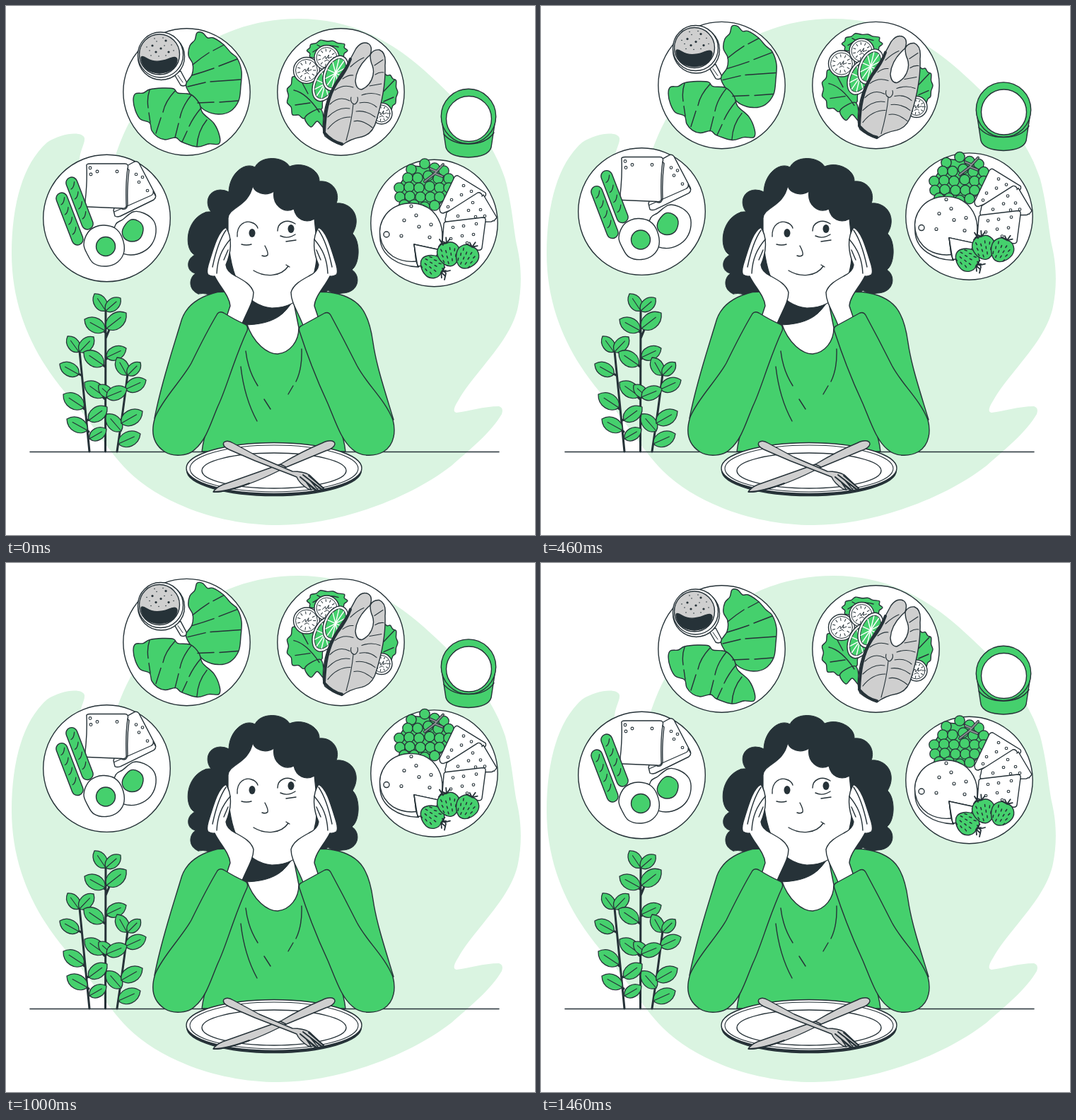
These frames come from a looping animation (748x748 px, 1500 ms). An HTML page:

```html
<!DOCTYPE html>
<html lang="en">
<head>
<meta charset="utf-8">
<title>Daydreaming of food</title>
<style>
html,body{margin:0;width:100%;height:100%;overflow:hidden;background:#fff}
svg{display:block;width:100vw;height:100vh}
</style>
</head>
<body>
<svg id="stage" viewBox="0 0 748 748" stroke-linecap="round" stroke-linejoin="round"></svg>
<script>
const INK = '#263238', GREEN = '#45d06d', PALE = '#daf4e1', GREY = '#cfcfcf', WHITE = '#fff';

const path = (d, fill = 'none', w = 1.4, stroke = INK) =>
  `<path d="${d}" fill="${fill}" stroke="${stroke}" stroke-width="${w}"/>`;
const oval = (x, y, rx, ry, fill = WHITE, w = 1.4) =>
  `<ellipse cx="${x}" cy="${y}" rx="${rx}" ry="${ry}" fill="${fill}" stroke="${INK}" stroke-width="${w}"/>`;
const disc = (x, y, r, fill, w) => oval(x, y, r, r, fill, w);
const at = (x, y, rot, body) => `<g transform="translate(${x} ${y}) rotate(${rot})">${body}</g>`;
const pairs = s => s.trim().split(/\s+/).map(p => p.split(',').map(Number));
const dots = (s, r, fill, w = 1.1) => pairs(s).map(([x, y]) => disc(x, y, r, fill, w)).join('');
const range = (n, fn) => Array.from({length: n}, (_, i) => fn(i)).join('');

// Smooth closed outline through a few points
function smooth(s, fill, w) {
  const p = pairs(s), n = p.length, q = i => p[(i + n) % n];
  let d = 'M' + p[0];
  for (let i = 0; i < n; i++) {
    const [a, b, c, e] = [q(i - 1), q(i), q(i + 1), q(i + 2)];
    const c1 = b.map((v, k) => v + (c[k] - a[k]) / 6);
    const c2 = c.map((v, k) => v - (e[k] - b[k]) / 6);
    d += `C${c1} ${c2} ${c}`;
  }
  return path(d + 'Z', fill, w);
}

function ruffle(x, y, rx, ry, n) {
  const pts = [];
  for (let i = 0; i < n * 2; i++) {
    const a = i * Math.PI / n, k = i % 2 ? 0.88 : 1 + 0.05 * Math.sin(i * 5);
    pts.push((x + rx * k * Math.cos(a)).toFixed(1) + ',' + (y + ry * k * Math.sin(a)).toFixed(1));
  }
  return smooth(pts.join(' '), GREEN);
}

function leaf(x1, y1, x2, y2) {
  const dx = x2 - x1, dy = y2 - y1;
  const pt = (u, v) => `${(x1 + u * dx - v * dy).toFixed(1)},${(y1 + u * dy + v * dx).toFixed(1)}`;
  return path(`M${pt(0, 0)}C${pt(.15, -.4)} ${pt(.75, -.42)} ${pt(1, 0)}C${pt(.75, .42)} ${pt(.15, .4)} ${pt(0, 0)}Z`, GREEN, 1.3)
    + path(`M${pt(0, 0)}L${pt(.72, 0)}`, 'none', 1.1);
}

function backdrop() {
  return path(`M8,350C8,285 22,225 58,193C78,180 108,176 111,187C112,195 103,206 104,222L150,228
    C158,198 170,168 190,138C235,75 310,18 413,18C510,18 570,70 610,108C655,150 690,195 706,245
    C716,285 717,310 722,337C730,370 729,400 724,425C714,475 660,520 640,557Q629,574 637,575
    C655,573 675,566 697,566Q704,568 701,577C686,603 655,628 630,650C565,700 465,734 385,734
    C300,734 218,702 173,658C140,625 120,585 85,548C40,495 8,430 8,350Z`, PALE, 0, 'none')
    + path('M34,630.5H697', 'none', 1.5);
}

function plant() {
  const stems = 'M140.5,630L141,430M141,470L150,448M141,462L130,453M140,510L126,498M141,500L152,490'
    + 'M140,556L126,543M141,552L154,543M118,630L104,488M106,522L92,514M111,570L98,559M115,586L126,577'
    + 'M117,602L104,591M157,630Q166,570 172,520M169,543L180,536M163,592L176,581M161,602L152,588M159,618L174,612';
  const leaves = [
    [141,431,125,407], [141,431,162,413], [140,459,111,443], [142,456,170,434],
    [103,489,87,467], [104,489,124,468], [138,508,110,489], [142,497,170,484],
    [103,521,76,506], [171,522,157,497], [172,522,190,504], [169,542,198,529],
    [139,552,111,532], [150,553,131,536], [142,553,171,541], [110,568,81,549],
    [117,586,143,567], [163,601,142,577], [163,590,193,573], [115,600,86,584],
    [118,612,142,598], [159,619,190,605]];
  return path(stems, 'none', 3) + leaves.map(l => leaf(...l)).join('');
}

function woman() {
  const hand = path(`M311,313C300,318 294,340 286,366Q283,377 286,380Q291,383 295,382
    C303,398 316,410 317,424L311,442L332,454C339,434 350,420 350,405C347,394 336,388 325,382
    Q312,376 311,366C318,350 321,328 311,313Z`, WHITE)
    + path('M311,317C302,330 296,350 292,369M317,330C305,344 299,358 298,378M314,345L308,359');
  const folds = `M339,488Q342,515 356,537M332,510Q337,554 355,587M365,556L374,570
    M418,485Q419,513 410,531M406,537L399,549`;
  const eyes = 'M327,326C326,309 338,303 347,306Q354,308 356,314M384,318C384,306 397,300 409,308M333,337Q340,339 347,337M396,333L410,331M388,325Q398,330 409,323';
  return path(`M272,407C258,402 258,385 268,378C255,376 254,358 267,352C253,346 252,308 277,294
      Q283,290 290,291C281,280 284,261 303,260Q310,260 315,263C316,236 338,220 352,228
      C360,211 392,212 401,227C420,219 444,232 443,248C462,246 473,264 467,279
      C488,277 504,298 490,322C501,332 501,364 489,373C502,381 500,405 476,406Q464,408 455,402
      L440,415H300Q285,404 272,407Z`, INK, 1)
    + path(`M340,403L299,404.500C268,412 252,428 247,448C235,488 219,535 210,583L285,598Q279,612 277,630H480
      Q478,612 472,598L548,585C536,545 524,510 519,476C513,432 500,410 455,404.500Z`, GREEN)
    + path('M340,448C350,478 370,492 384,492C402,490 414,474 414,455L404,405H345Z', WHITE)
    + path('M344,405H412Q404,423 391,435C377,447 358,451 334,451Z', INK, 1)
    + path(`M314,320V300C315,284 343,284 349,254C351,264 366,270 379,262C376,281 392,294 407,287
      C410,302 424,308 436,301L440,340C440,390 420,427 376,427C340,424 316,390 314,320Z`, WHITE, 1.2)
    + path(eyes + 'M366,339Q371,348 370,352Q368,355 362,353M350,374C366,384 389,383 399,368M396,366L401,369')
    + oval(348, 321, 4.5, 6, INK, 0) + oval(403, 315, 4.5, 6, INK, 0)
    + hand + `<g transform="translate(753) scale(-1 1)">${hand}</g>`
    + path(`M299,435Q302,431 308,434Q324,444 338,450Q343,453 341,459C322,500 312,540 300,565
      C290,588 284,612 268,626C258,637 236,638 224,630C206,618 205,600 211,581C222,555 248,530 262,505Q284,460 299,435Z`, GREEN)
    + path(`M459,437Q456,432 451,434L418,452Q413,454 415,460C428,500 440,530 455,562
      C466,588 474,614 490,627C502,638 522,637 534,630C550,620 551,600 547,585C535,555 510,535 496,508Q478,472 459,437Z`, GREEN)
    + path(folds);
}

function emptyPlate() {
  return oval(379, 656.5, 123.5, 36, INK) + oval(379, 653.5, 124, 36)
    + oval(379, 654, 119, 33, 'none', 1.1) + oval(379, 657, 118 - 16, 25)
    + path('M461,615Q467,617 464,622Q460,627 452,629L394,653L388,648Q420,629 447,618Q455,614 461,615Z', GREY)
    + path('M388,648L396,652Q350,676 316,684Q301,688 293,687Q297,681 306,677Z', GREY)
    + path('M294,687Q312,687 344,675', 'none', 2)
    + path(`M308,617Q313,613 321,618L358,638L405,658Q420,658 429,663L449,682L446,684L431,672L441,684L437,685
      L425,674L432,684L427,683Q414,674 411,666L401,662L352,643L315,627Q305,622 308,617Z`, GREY)
    + path('M420,663L446,683M416,666L438,684M428,664L449,682', 'none', 2);
}

function breakfast() {
  return disc(255.5, 121.5, 89.7)
    + path('M237,95L247,112Q253,115 256,109L247,92Z', WHITE) + path('M243,98L250,108', 'none', 1)
    + disc(219.5, 71.5, 33) + disc(218.5, 69, 32) + disc(217, 68.500, 28.5, GREY)
    + path('M191,74Q191,69 199,74Q207,79 217,78Q226,77 232,74Q242,70 242,77Q239,94 217,95Q194,94 191,74Z', INK)
    + dots('207,56 219,60 226,49 212,65 230,65', 1.6, INK, 0)
    + dots('203,63 213,50 222,45 224,56 234,55 216,71 226,70 205,70 237,63 199,58 210,46', .8, INK, 0)
    + smooth(`270,38 278,38 285,45 293,45 307,54 318,66 327,74 333,92 332,113 329,134 317,149 300,153
      282,148 270,137 257,119 255,109 263,97 264,82 258,70 260,56 267,48`, GREEN)
    + smooth(`180,133 183,124 194,123 203,118 221,116 237,117 243,123 261,125 273,137 278,151 294,166 302,184
      301,195 287,195 270,199 248,192 240,186 225,189 214,185 206,176 203,165 190,160 183,148`, GREEN)
    + path(`M264,83Q276,73 287,66M293,63L308,55M263,98Q280,93 294,88M301,85L327,75
      M257,114L282,108M289,107L332,104M271,137L294,136M302,136L328,134
      M203,119Q199,130 201,144M202,151L204,165M239,120Q225,135 222,150M219,158L212,180
      M262,126Q249,142 246,158M244,166L239,186M276,144Q265,157 259,170M256,177L249,192M284,161Q271,177 270,198`);
}

function radish(x, y, r) {
  return disc(x, y, r) + disc(x, y, r - 3, WHITE, 1)
    + range(11, i => at(x, y, i * 33, path(`M${r * .52},0H${r * .7}`, 'none', 1)))
    + path(`M${x - 6},${y + 2}l4,-4 1,4 4,-6 -1,5 5,-2M${x - 3},${y + 5}l4,-2 2,2`, 'none', 1);
}

function lemon(x, y) {
  return at(x, y, 24, oval(0, 0, 16, 26) + oval(0, 0, 12.5, 22, GREEN, 1)
    + range(5, i => {
      const a = i * Math.PI / 5, dx = 12 * Math.cos(a), dy = 21 * Math.sin(a);
      return path(`M${-dx},${-dy}L${dx},${dy}`, 'none', 1.4, WHITE);
    }));
}

function salmon() {
  return disc(473.5, 121.5, 89.7)
    + ruffle(454, 63, 29, 15, 10) + ruffle(424, 127, 28, 34, 11) + ruffle(539, 122, 15, 27, 10)
    + smooth('423,157 431,171 440,163 449,171 445,146', GREEN)
    + path('M434,65Q453,52 470,58M440,55L449,60M407,119Q425,123 443,150M409,140L430,137M418,107L427,124M530,125L549,105M534,135L548,129')
    + radish(425, 91, 18.5) + radish(453.500, 73, 17.5) + radish(531, 152, 15)
    + lemon(451, 110) + lemon(466, 95)
    + path(`M512,53Q503,49 495,60L482,84C465,107 454,126 450,151Q446,173 451,184Q462,193 475,197
      Q486,188 503,185Q519,181 524,161C531,138 537,109 536,84Q538,66 528,62Q519,61 515,69
      Q519,57 512,53Z`, GREY)
    + path('M487,75Q482,90 468,108C454,129 451,155 450,179Q461,192 475,195', 'none', 4)
    + path('M514,70C505,78 495,90 494,106Q495,118 503,118C515,113 523,98 518,84Q515,78 515,69Z', WHITE)
    + path(`M488,129Q486,137 493,139Q499,135 497,129M491,139Q489,162 481,190M487,86Q498,76 506,73
      M476,103Q484,97 491,98M465,119Q477,110 491,115M458,139Q471,126 486,134M455,157Q470,142 486,145
      M455,174Q468,157 487,157M521,84L533,76M522,97Q528,93 534,94M514,113L531,110
      M503,126Q517,121 529,126M500,137Q514,134 524,143M495,149Q509,147 522,157M492,163Q503,160 518,172`, 'none', 1.1);
}

function sausage(x, y, rot) {
  return at(x, y, rot, `<rect x="-8" y="-39" width="16" height="78" rx="8" fill="${GREEN}" stroke="${INK}" stroke-width="1.4"/>`
    + range(4, i => path(`M-4,${-23 + i * 15}Q1,${-24 + i * 15} 4,${-31 + i * 15}Q0,${-23 + i * 15} -4,${-23 + i * 15}Z`, INK, 1.2)));
}

function eggs() {
  return disc(142.5, 300, 89.8)
    + path('M152,289L154,297Q157,299 162,297L209,274Q213,271 211,266L188,222Q185,218 180,221L171,226Z', WHITE)
    + path('M153,291L205,268Q209,266 208,262M211,268L208,262', 'none', 1.2)
    + dots('184,238 193,242 188,249 200,261', 1.8, WHITE)
    + path('M114,226Q113,223 119,223H168Q174,223 172,230Q169,250 170,280Q171,287 164,286L116,284Q111,284 112,276Q115,250 114,226Z', WHITE)
    + path('M172,230L174,232Q171,255 172,281Q171,289 164,287', 'none', 1.4)
    + dots('119,229 129,234 120,238 157,234', 1.9, WHITE)
    + sausage(90, 301, -21) + sausage(104, 279, -21)
    + smooth('180,291 195,293 209,304 212,320 206,337 193,348 176,352 161,347 151,330 155,309 165,302', WHITE)
    + smooth('175,303 187,304 194,314 190,328 178,333 167,328 165,316', GREEN)
    + smooth('139,310 154,314 164,327 167,347 158,362 142,368 124,364 115,351 110,337 116,320 127,312', WHITE)
    + disc(141, 340, 13.5, GREEN);
}

function berry(x, y, rot) {
  return at(x, y, rot, path('M0,-15C9,-18 17,-9 16,0C14,11 6,18 0,18C-6,18 -14,11 -16,0C-17,-9 -9,-18 0,-15Z', GREEN)
    + range(12, i => {
      const sx = (i % 4 - 1.5) * 6.5, sy = Math.floor(i / 4) * 8 - 8 + (i % 2) * 3;
      return path(`M${sx},${sy}l${sx * -.1},3`, 'none', 1.5);
    })
    + path('M0,-15L-6,-19M0,-15L6,-20M0,-15L1,-23M0,-15L-9,-15', 'none', 1.8));
}

function cheese() {
  const grapes = `592,223 573,231 606,229 619,233 568,243 582,243 597,240 626,244 611,244 556,257 570,256
    584,257 599,255 613,257 626,257 557,270 571,269 586,270 600,270 613,270 563,281 577,281 592,284 606,282`;
  return disc(605.5, 307, 89.7)
    + path('M555,255L575,226L620,230L628,262L610,284L560,284Z', GREEN)
    + dots(grapes, 7.2, GREEN, 1.3)
    + path('M618,224L605,238L592,248M609,234L600,230M607,237L617,241', 'none', 4)
    + path('M618,224L605,238L592,248M609,234L600,230M607,237L617,241', 'none', 2, '#8a8f91')
    + path('M639,240L678,264Q680,269 674,271L618,293Q613,293 613,286L634,242Q636,239 639,240Z', WHITE)
    + path('M667,264Q671,263 673,267L690,299Q691,304 686,305L624,306Q619,305 622,298L623,292Z', WHITE)
    + path('M673,269L675,267L694,299L690,304', WHITE)
    + path('M619,309Q619,305 623,305L674,299Q679,299 678,304L673,342Q672,346 667,345L621,340Q616,339 617,334Z', WHITE)
    + dots('647,254 658,262 644,267 630,274 625,284 660,278 671,288 654,289 639,297 677,297 664,298 632,313 647,311 665,308 661,323 645,325 629,329 652,335', 1.8, WHITE)
    + path('M529,319V330C531,353 554,368 583,369L612,342L617,319Z', WHITE)
    + path(`M577,337L614,345C620,323 617,304 603,290C584,273 552,276 537,295
      C522,315 528,341 547,354Q562,363 580,361Z`, WHITE)
    + path('M577,337L614,345L600,366L582,368Z', WHITE) + path('M577,337L580,361L583,369')
    + disc(538, 323, 4, WHITE) + dots('563,303 580,296 584,312 599,327 559,325 601,309 573,283', 2, WHITE)
    + berry(603, 368, 125) + berry(626, 350, -12) + berry(652, 354, 28)
    + path('M617,371L622,378M622,378L620,387M620,376L628,374M612,340L617,334M613,330L618,338', 'none', 1.8);
}

function glass() {
  return path('M615.500,157L622,200Q626,213 654,214Q682,213 686,200L692.500,157Z', GREEN)
    + path('M619,181Q630,195 654,195Q679,195 690,179')
    + disc(654, 156, 38.7, GREEN) + disc(654.5, 159.5, 32);
}

const stage = document.getElementById('stage');
stage.innerHTML = backdrop() + plant() + woman() + emptyPlate()
  + `<g id="food">${breakfast()}${salmon()}${eggs()}${cheese()}${glass()}</g>`;
const food = document.getElementById('food');

// The dishes rise and sink at constant speed, 24 poses per second
const LOOP = 1500, STEP = 1000 / 24, LIFT = 15, MID = 17.5;
function draw(now) {
  const t = now % LOOP;
  const pose = Math.floor((Math.floor(t / 10) * 10 + 4.9) / STEP);
  const y = -LIFT * (1 - Math.abs(pose - MID) / MID);
  food.setAttribute('transform', `translate(0 ${y.toFixed(2)})`);
}
const start = performance.now();
function tick() {
  draw(performance.now() - start);
  requestAnimationFrame(tick);
}
tick();
</script>
</body>
</html>
```
